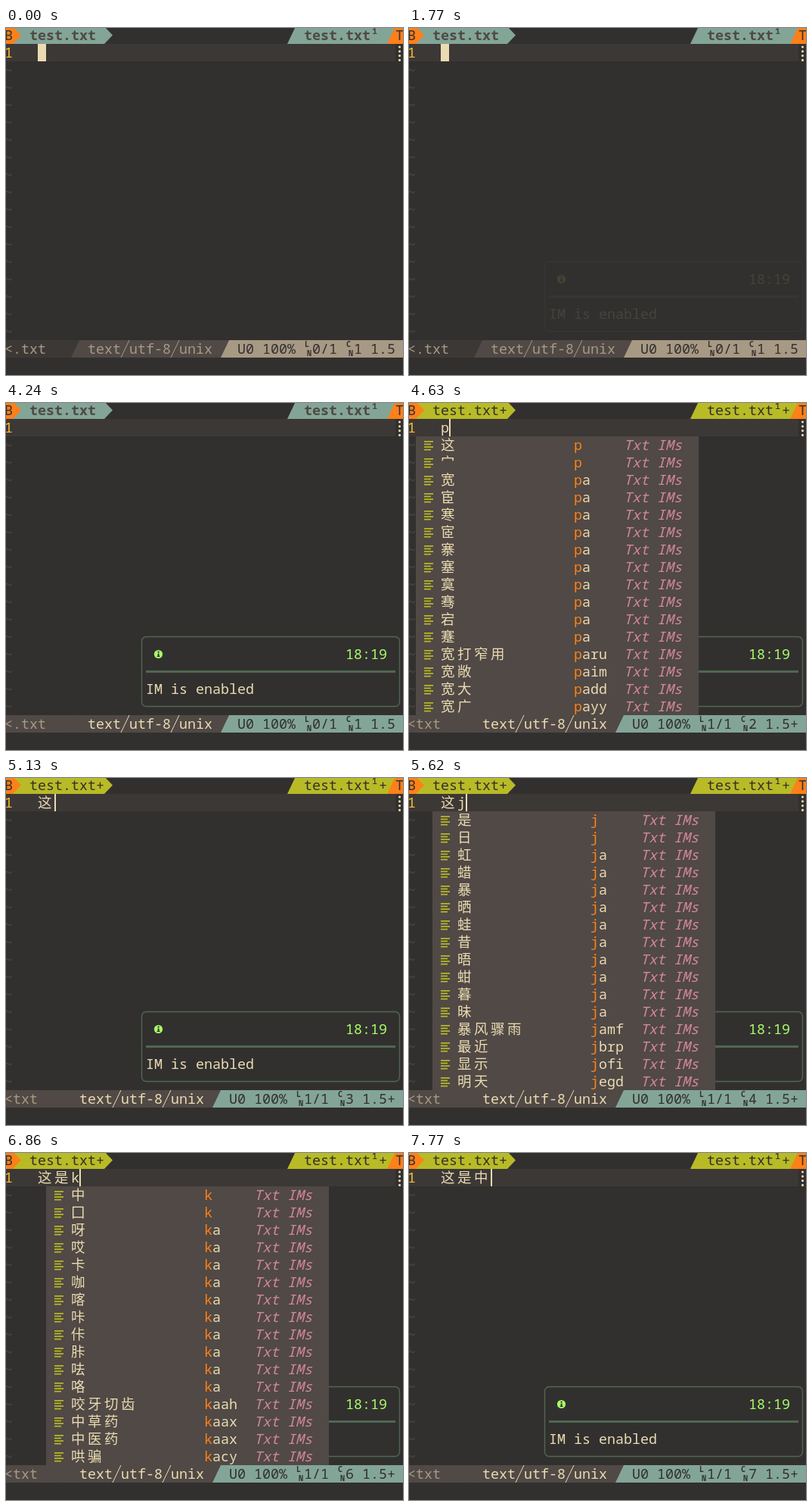
Animation of 525 by 458 pixels, one loop 8 s. Source, as an HTML page with a canvas:

```html
<!DOCTYPE html>
<html lang="zh-Hans">
<head>
<meta charset="utf-8">
<title>Input method in an editor</title>
<style>
  html, body { margin: 0; width: 100%; height: 100%; overflow: hidden; background: #32302f; }
  canvas { display: block; width: 525px; height: 458px; }
</style>
</head>
<body>
<canvas id="stage"></canvas>
<script>
const WIDTH = 525, HEIGHT = 458, LOOP = 8000;
const CELL = 11, LINE = 23, LEFT = -2, TOP = -2;
const BG = '#32302f', LINE_BG = '#3c3836', PANEL = '#504945', TAN = '#a89984', CREAM = '#ebdbb2';
const TEAL = '#83a598', LIME = '#b8bb26', ORANGE = '#fe8019', YELLOW = '#fabd2f', PINK = '#d3869b';
const MONO = '18.33px "Noto Sans Mono", "DejaVu Sans Mono", monospace';
const HAN = '18.5px "Noto Sans CJK SC", "Noto Sans CJK", sans-serif';

const canvas = document.getElementById('stage');
const ctx = canvas.getContext('2d');
const scale = window.devicePixelRatio || 1;
canvas.width = WIDTH * scale;
canvas.height = HEIGHT * scale;
ctx.scale(scale, scale);

const MENUS = {
  p: '这p 宀p 宽pa 宦pa 寒pa 宧pa 寨pa 塞pa 寞pa 骞pa 宕pa 蹇pa 宽打窄用paru 宽敞paim 宽大padd 宽广payy',
  j: '是j 日j 虹ja 蜡ja 暴ja 晒ja 蛙ja 昔ja 晤ja 蚶ja 暮ja 昧ja 暴风骤雨jamf 最近jbrp 显示jofi 明天jegd',
  k: '中k 囗k 呀ka 哎ka 卡ka 咖ka 喀ka 咔ka 佧ka 胩ka 呿ka 咯ka 咬牙切齿kaah 中草药kaax 中医药kaax 哄骗kacy',
  kh: '中kh 足khu 嘘khag 唬kham 中国khlg 中心khny 跑步khhi 中文khyy'
};

// Buffer states: start time, text, key of the open menu.
const EDITS = [
  [0, ''],
  [4400, 'p', 'p'], [4920, 'p'], [5130, '这'],
  [5620, '这j', 'j'], [6190, '这j'], [6480, '这是'],
  [6860, '这是k', 'k'], [7150, '这是kh', 'kh'], [7670, '这是kh'], [7770, '这是中']
];
const BLINKS = [290, 870, 1290, 1770, 2270, 2770, 3270];
const INSERT_AT = 3510, NOTICE_AT = 1770, FADE_STEP = 60, FADE_TAU = 510;

const rowY = row => TOP + row * LINE;
const isWide = ch => ch >= '\u2e80';
const textWidth = text => [...text].reduce((sum, ch) => sum + (isWide(ch) ? 2 : 1) * CELL, 0);

function rect(x, y, w, h, color) {
  ctx.fillStyle = color;
  ctx.fillRect(x, y, w, h);
}

function shape(color, ...points) {
  ctx.fillStyle = color;
  ctx.beginPath();
  points.forEach(([x, y]) => ctx.lineTo(x, y));
  ctx.fill();
}

function put(text, x, row, color, style = '') {
  ctx.fillStyle = color;
  for (const ch of text) {
    ctx.font = `${style} ${isWide(ch) ? HAN : MONO}`;
    ctx.fillText(ch, x, rowY(row) + 18);
    x += isWide(ch) ? 2 * CELL : CELL;
  }
}

// Fills from a rising slant at x up to the given right edge.
function slanted(x, right, row, color) {
  const y = rowY(row);
  shape(color, [x, y + LINE], [x + CELL, y], [right, y], [right, y + LINE]);
}

function arrow(x, color) {
  shape(color, [x, TOP], [x + CELL, TOP + LINE / 2], [x, TOP + LINE]);
}

function thinSlash(x, row, color) {
  ctx.strokeStyle = color;
  ctx.lineWidth = 1;
  ctx.beginPath();
  ctx.moveTo(x, rowY(row) + LINE);
  ctx.lineTo(x + CELL, rowY(row));
  ctx.stroke();
}

function drawTabs(modified) {
  const color = modified ? LIME : TEAL;
  const ink = modified ? BG : PANEL, style = modified ? '' : 'bold', mark = modified ? '+' : '';
  rect(0, 0, 130, 21, color);
  rect(0, 0, 9, 21, ORANGE);
  arrow(9, ORANGE);
  arrow(130, color);
  put('B', LEFT, 0, BG);
  put('test.txt' + mark, 31, 0, ink, style);
  slanted(372, WIDTH, 0, color);
  put('test.txt¹' + mark, 394, 0, ink, style);
  slanted(504, WIDTH, 0, ORANGE);
  put('T', 515, 0, BG);
}

function drawBuffer(text) {
  rect(0, 21, 515, LINE, LINE_BG);
  put('1', LEFT, 1, YELLOW);
  put(text, 42, 1, CREAM);
  for (let i = 0; i < 4; i++) {
    ctx.fillStyle = CREAM;
    ctx.beginPath();
    ctx.arc(520.5, 25 + i * 5.8, 1.6, 0, 7);
    ctx.fill();
  }
  for (let row = 2; row < 18; row++) put('~', LEFT, row, PANEL);
}

function stackedLabel(letter, x) {
  ctx.fillStyle = BG;
  ctx.font = 'bold 10px "Noto Sans Mono", monospace';
  ctx.fillText(letter, x, 421);
  ctx.fillText('N', x + 3, 433);
}

function drawStatus(insert, modified, column) {
  const row = 18, shift = modified ? -CELL : 0, ink = insert ? CREAM : TAN;
  rect(0, 412, WIDTH, LINE, insert ? PANEL : LINE_BG);
  slanted(86 + shift, WIDTH, row, PANEL);
  put(modified ? '<txt' : '<.txt', LEFT, row, TAN);
  put('text', 108 + shift, row, ink);
  thinSlash(152 + shift, row, ink);
  put('utf-8', 163 + shift, row, ink);
  thinSlash(218 + shift, row, ink);
  put('unix', 229 + shift, row, ink);
  slanted(284 + shift, WIDTH, row, insert ? TEAL : TAN);
  put('U0 100%', 306 + shift, row, BG);
  stackedLabel('L', 395 + shift);
  put(modified ? '1/1' : '0/1', 405 + shift, row, BG);
  stackedLabel('C', 450 + shift);
  put(String(column), 460 + shift, row, BG);
  put(modified ? '1.5+' : '1.5', 482 + shift, row, BG);
}

function drawNotice(opacity) {
  const green = '#a9ff68', edge = '#4f6752';
  ctx.save();
  ctx.globalAlpha = opacity;
  ctx.strokeStyle = edge;
  ctx.lineWidth = 1.4;
  ctx.beginPath();
  ctx.roundRect(179.5, 308.5, 341, 92, 6);
  ctx.stroke();
  rect(185, 353, 330, 3, edge);
  ctx.fillStyle = green;
  ctx.beginPath();
  ctx.arc(201.5, 331.5, 5.6, 0, 7);
  ctx.fill();
  ctx.globalAlpha = 1;
  rect(200.6, 327.6, 2, 2, BG);
  rect(200.6, 330.6, 2, 4, BG);
  rect(199.6, 333.8, 4, 1.2, BG);
  ctx.globalAlpha = opacity;
  put('18:19', 449, 14, green);
  put('IM is enabled', 185, 16, CREAM);
  ctx.restore();
}

function drawMenu(key, text) {
  const items = MENUS[key].split(' ');
  const x = 42 + textWidth(text) - textWidth(key) - 3 * CELL;
  rect(x, 44, 34 * CELL, items.length * LINE, PANEL);
  items.forEach((item, i) => {
    const row = i + 2, y = rowY(row);
    const [, word, code] = item.match(/^(\W+)(\w+)$/);
    for (let k = 0; k < 4; k++) rect(x + 11, y + 6 + k * 3.6, k % 2 ? 9 : 12, 1.7, LIME);
    put(word, x + 33, row, CREAM);
    put(key, x + 209, row, ORANGE);
    put(code.slice(key.length), x + 209 + textWidth(key), row, CREAM);
    put('Txt IMs', x + 275, row, PINK, 'italic');
  });
}

function drawCursor(t, insert, text) {
  if (insert) {
    if (t < 4240 || t >= 4400) rect(42 + textWidth(text), 21, 2, LINE, CREAM);
  } else if (BLINKS.filter(at => at <= t).length % 2 === 0) {
    rect(42, 21, CELL, LINE, CREAM);
  }
}

function draw(t) {
  const [, text, menu] = EDITS.filter(([at]) => at <= t).pop();
  const insert = t >= INSERT_AT, modified = text !== '';
  rect(0, 0, WIDTH, HEIGHT, BG);
  drawTabs(modified);
  drawBuffer(text);
  drawStatus(insert, modified, 1 + textWidth(text) / CELL);
  if (t >= NOTICE_AT) {
    const steps = Math.floor((t - NOTICE_AT) / FADE_STEP) + 1;
    drawNotice(t >= 4020 ? 1 : 1 - Math.exp(-steps * FADE_STEP / FADE_TAU));
  }
  if (menu) drawMenu(menu, text);
  drawCursor(t, insert, text);
}

const start = performance.now();
function tick() {
  draw((performance.now() - start) % LOOP);
  requestAnimationFrame(tick);
}
tick();
</script>
</body>
</html>
```
